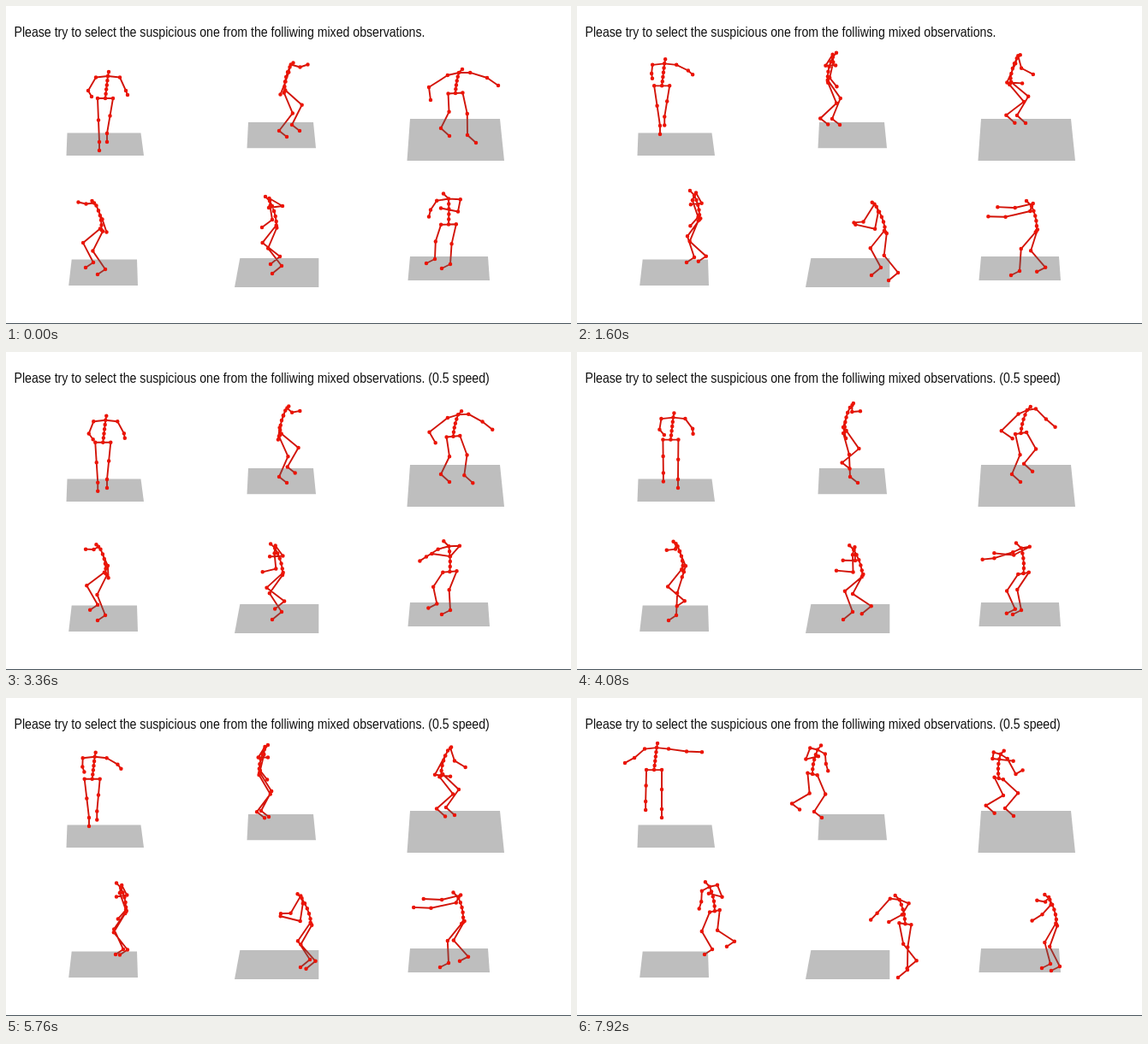
An HTML page that plays this animation: 660 px wide and 372 px high, repeating every 8000 ms.

```html
<!DOCTYPE html>
<html lang="en">
<head>
<meta charset="utf-8">
<title>Mixed observations</title>
<style>
  html, body { margin: 0; width: 100%; height: 100%; overflow: hidden; background: #fff; }
  svg { display: block; width: 660px; height: 372px; }
  text { font-family: "Liberation Sans", Arial, sans-serif; font-size: 16.6px; fill: #111; }
  path { fill: none; stroke-linecap: round; stroke-linejoin: round; }
  .bones { stroke: #d21409; stroke-width: 1.9; }
  .dots { stroke: #ec1406; stroke-width: 4.5; }
  polygon { fill: rgba(92, 92, 92, .4); }
</style>
</head>
<body>
<svg viewBox="0 0 660 372">
  <text id="title" transform="translate(9.5 36.2) scale(.852 1)"></text>
  <g id="stage"></g>
  <rect y="371" width="660" height="1" fill="#46525a"/>
</svg>
<script>
const LOOP = 8000, FRAME = 80;
const SLOW_START = 2800, SLOW_ZERO = 2860;
const MOTION = 2640, FIRST_STEP = 20, STEP_GAP = 880, STEP_TIME = 950;
const LEG = 26, HIP = 9, SHOULDER = 14;
const TITLE = "Please try to select the suspicious one from the folliwing mixed observations.";

// root, spine, yaw, elbow and hand hold one to three evenly spaced key values.
// spine leads from pelvis to neck; elbow and hand are measured from the neck.
// steps are the spots where the toes land; face is -1 for left, 1 for right.
const walkers = [
  {
    floor: "71.5,148.5 157.5,148.5 161,175 70.5,175", face: 1, yaw: [0],
    root: [[116, 108], [102, 96], [89, 83]], spine: [[3, -26]], head: [1, -5], foot: [0, -10],
    near: {
      elbow: [[-23, 17], [-14, 12], [-28, 12]], hand: [[-19, 24], [-11, 18], [-41, 18]],
      steps: [[109, 169], [97, 150], [78, 132]]
    },
    far: {
      elbow: [[21, 17], [26, 9.5], [36, 4]], hand: [[23, 22], [29, 15], [56, 4]],
      steps: [[118, 159], [99, 140]]
    }
  },
  {
    floor: "283,136 359,136 362,166.3 281.5,166.3", face: 1, yaw: [85, 85, 135],
    root: [[325.5, 100], [298.5, 89], [273, 89.5]], spine: [[6, -28.5]], head: [4, -5], foot: [-9, -7],
    near: {
      elbow: [[-5, 17], [-6, 25], [12, 15]], hand: [[-11, 32], [2, 36], [13, 23]],
      steps: [[328, 153], [286, 140]]
    },
    far: {
      elbow: [[12, 0], [-6, 9], [-14, 11]], hand: [[21, -3], [5, 9], [1, 7]],
      steps: [[343, 146], [307, 139], [254, 133]]
    }
  },
  {
    floor: "472,132 577,132 582,181 468.5,181", face: 1, yaw: [20, 72, 130],
    root: [[525, 102], [510, 91], [491, 95]], spine: [[4, -24], [8, -29], [1, -28]], head: [4, -4], foot: [-10, -9],
    near: {
      elbow: [[-35, 17], [-18, 28], [22, 22]], hand: [[-33, 32], [0, 31], [28, 17]],
      steps: [[518, 152], [510, 138]]
    },
    far: {
      elbow: [[33, 6], [10, 12], [-11, 4]], hand: [[46, 15], [22, 20], [15, 6]],
      steps: [[549, 160], [524, 137], [483, 138]]
    }
  },
  {
    floor: "76.7,296.5 153,296.5 154,327 73.2,327", face: -1, yaw: [100, 88, 45],
    root: [[111.5, 262], [137.5, 251], [163, 249.5]], spine: [[-6, -28.5]], head: [-5, -5.5], foot: [9, -6],
    near: {
      elbow: [[7, 16], [7, 26], [-12, 16]], hand: [[12, 31], [-2, 37], [-13, 24]],
      steps: [[107, 314], [149, 300]]
    },
    far: {
      elbow: [[-12, -2], [6, 8], [15, 12]], hand: [[-21, -4], [-6, 10], [-1, 7]],
      steps: [[93, 306], [128, 300], [181, 293]]
    }
  },
  {
    floor: "273.3,295 365.3,295 365.3,329 267,329", face: -1, yaw: [92, 92, 148],
    root: [[316, 258], [353, 264], [386, 264]], spine: [[-8, -30], [-11, -30], [-6, -28]], head: [-5, -5], foot: [11, -9],
    near: {
      elbow: [[3, 22], [-2, 27], [4, 16]], hand: [[-9, 31], [-25, 21], [-10, 27]],
      steps: [[311, 313], [375, 327]]
    },
    far: {
      elbow: [[15, 6], [-11, 17], [-27, 15]], hand: [[-1, 8], [-23, 17], [-34, 24]],
      steps: [[309, 302], [344, 315], [391, 320]]
    }
  },
  {
    floor: "472,293 563,293 565,321 469.5,321", face: -1, yaw: [10, 75, 95],
    root: [[517, 255.5], [531.5, 262], [563.5, 265]], spine: [[0, -30], [-5, -29], [-8, -29]], head: [-6, -6], foot: [10, -5],
    near: {
      elbow: [[-21, 13], [-33, 12], [-5, 18]], hand: [[-23, 21], [-53, 11], [-15, 27]],
      steps: [[491, 301], [507, 315], [560, 323]]
    },
    far: {
      elbow: [[11, 15], [-19, 3], [-2, 3]], hand: [[-9, 11], [-41, 2], [-10, 1]],
      steps: [[509, 307], [543, 316]]
    }
  }
];

const stage = document.getElementById("stage");
const title = document.getElementById("title");

function add(tag, attrs) {
  const el = document.createElementNS("http://www.w3.org/2000/svg", tag);
  for (const name in attrs) el.setAttribute(name, attrs[name]);
  return stage.appendChild(el);
}

for (const w of walkers) {
  w.bones = add("path", { class: "bones" });
  add("polygon", { points: w.floor });
  w.dots = add("path", { class: "dots" });
}

const plus = (a, b) => [a[0] + b[0], a[1] + b[1]];
const mix = (a, b, u) => a.map((v, k) => v + (b[k] - v) * u);

// Constant, line or parabola through one, two or three values.
function curve([a, b, c], u) {
  if (b === undefined) return a;
  if (c === undefined) return a + (b - a) * u;
  return a * (1 - u) * (1 - 2 * u) + b * 4 * u * (1 - u) + c * u * (2 * u - 1);
}
const path = (points, u) => [0, 1].map(k => curve(points.map(p => p[k]), u));

// The feet take turns; the one with fewer landing spots waits one step.
function toeAt(spots, time) {
  let toe = spots[0];
  for (let i = 1; i < spots.length; i++) {
    const step = 2 * (i - 1) + (spots.length === 2 ? 1 : 0);
    const u = Math.min(1, Math.max(0, (time - FIRST_STEP - step * STEP_GAP) / STEP_TIME));
    toe = mix(toe, spots[i], u * u * (3 - 2 * u));
    toe = plus(toe, [0, -5 * Math.sin(Math.PI * u)]);
  }
  return toe;
}

function kneeAt(hip, ankle, forward) {
  const dx = ankle[0] - hip[0], dy = ankle[1] - hip[1], d = Math.hypot(dx, dy);
  const bend = forward * Math.sqrt(Math.max(9, LEG * LEG - d * d / 4)) / d;
  return plus(mix(hip, ankle, .5), [dy * bend, -dx * bend]);
}

function spineDots(neck, pelvis, bow) {
  const bend = plus(mix(neck, pelvis, .5), [bow, 0]);
  return [0, .2, .4, .6, .8, 1].map(u => mix(mix(neck, bend, u), mix(bend, pelvis, u), u));
}

function limbsOf(w, time) {
  const u = time / MOTION;
  const angle = curve(w.yaw, u) * Math.PI / 180;
  const across = Math.cos(angle), depth = Math.sin(angle);
  const forward = w.face * depth;
  const pelvis = path(w.root, u);
  const neck = plus(pelvis, path(w.spine, u));

  const arm = (part, side) => [
    neck,
    plus(neck, [side * SHOULDER * across, 1.5 - side * 4.5 * depth]),
    plus(neck, path(part.elbow, u)),
    plus(neck, path(part.hand, u))
  ];
  const leg = (part, side) => {
    const hip = plus(pelvis, [side * HIP * across, -side * 1.5 * depth]);
    const toe = toeAt(part.steps, time);
    const ankle = plus(toe, w.foot);
    return [pelvis, hip, kneeAt(hip, ankle, forward), ankle, toe];
  };
  return [
    [plus(neck, w.head), ...spineDots(neck, pelvis, -4 * forward)],
    arm(w.near, -1), arm(w.far, 1), leg(w.near, -1), leg(w.far, 1)
  ];
}

const xy = p => p.map(v => v.toFixed(2)).join(" ");
const line = points => "M" + points.map(xy).join("L");
const dot = p => "M" + xy(p) + "h.01";

function draw(elapsed) {
  const t = Math.floor(elapsed % LOOP / FRAME) * FRAME;
  const slow = t >= SLOW_START;
  const time = slow ? (t - SLOW_ZERO) / 2 : t;
  title.textContent = slow ? TITLE + " (0.5 speed)" : TITLE;
  for (const w of walkers) {
    const limbs = limbsOf(w, time);
    w.bones.setAttribute("d", limbs.map(line).join(""));
    w.dots.setAttribute("d", limbs.flat().map(dot).join(""));
  }
}

const start = performance.now();
function tick() {
  draw(performance.now() - start);
  requestAnimationFrame(tick);
}
tick();
</script>
</body>
</html>
```
